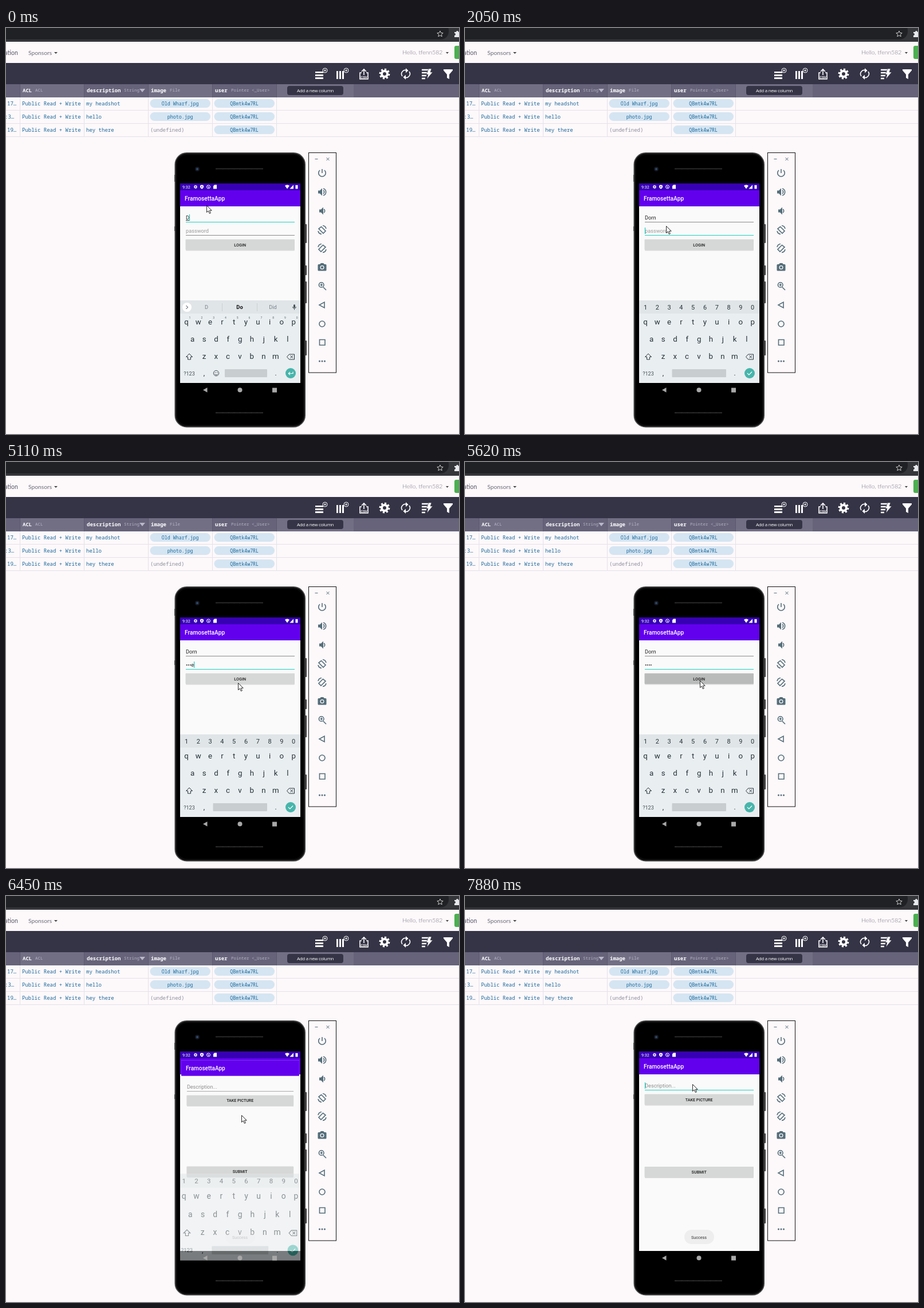
Recreate the animation shown at these times as an HTML page. Size 791x708 px, loop 8000 ms.

```html
<!DOCTYPE html>
<html lang="en">
<head>
<meta charset="utf-8">
<title>Login demo</title>
<style>
html, body { margin: 0; width: 100%; height: 100%; overflow: hidden; background: #fdf8fa; }
svg { display: block; }
text { white-space: pre; font-family: Roboto, sans-serif; }
.mono { font-family: "Noto Sans Mono", "DejaVu Sans Mono", monospace; }
.nav { font-family: Lato, sans-serif; }
.add { font-family: "Open Sans", sans-serif; letter-spacing: -.3px; }
.line { fill: none; stroke-width: 1.6; }
</style>
</head>
<body>
<svg id="stage" width="791" height="708" viewBox="0 0 791 708"></svg>
<script>
const stage = document.getElementById('stage');
const $ = id => document.getElementById(id);
const rect = (x, y, w, h, fill, more = '') =>
  `<rect x="${x}" y="${y}" width="${w}" height="${h}" fill="${fill}" ${more}/>`;
const disc = (x, y, r, fill, more = '') => `<circle cx="${x}" cy="${y}" r="${r}" fill="${fill}" ${more}/>`;
const path = (d, more = '') => `<path d="${d}" ${more}/>`;
const text = (x, y, s, size, fill, more = '') =>
  `<text x="${x}" y="${y}" font-size="${size}" fill="${fill}" ${more}>${s}</text>`;
const mid = 'text-anchor="middle"';
const group = (x, y, body, more = '') => `<g transform="translate(${x} ${y})" ${more}>${body}</g>`;
const gear = (r, w, color) =>
  disc(0, 0, r, 'none', `stroke="${color}" stroke-width="${w}"`) +
  disc(0, 0, r + w * .7, 'none', `stroke="${color}" stroke-width="${w * .8}" pathLength="16" stroke-dasharray="1"`);

function browser() {
  const plus = (x, y) => disc(x, y, 4, '#353446', 'stroke="#fff"') +
    path(`M${x - 2} ${y}h4m-2-2v4`, 'stroke="#fff"');
  const bars = [0, 1, 2].map(i => rect(540, 76 + i * 5, 14, i ? 3 : 2.5, '#fff') +
    rect(577 + i * 5, 75, 3, 14, '#fff')).join('');
  return rect(0, 0, 791, 24, '#35363a') + rect(-20, -10, 793, 30, '#202124', 'rx="14"') +
    path('M758 5l1.5 3.4 3.7.4-2.8 2.4.8 3.7-3.2-2-3.2 2 .8-3.7-2.8-2.4 3.7-.4z', 'fill="none" stroke="#ccc"') +
    path('M783 7h3a2 2 0 0 1 4 0h3v9h-10v-3a2 2 0 0 0 0-4z', 'fill="#e8eaed"') +
    text(21, 47, 'ation', 10.6, '#555566', 'class="nav" text-anchor="end"') +
    text(39, 47, 'Sponsors', 10.3, '#6b6b78', 'class="nav"') + path('M84 42h6l-3 3z', 'fill="#444"') +
    text(692, 46, 'Hello, tfenn582', 10.4, '#777784', 'class="nav" font-weight="300"') +
    path('M768 42h5l-2.500 3z', 'fill="#444"') +
    rect(783, 31, 20, 23, '#4caf50', 'rx="3"') +
    rect(0, 61, 791, 37, '#353446') + bars + plus(557, 74) + plus(594, 74) +
    path('M621 78h-3v11h14v-11h-3M625 82v-10m-4 4 4-4 4 4', 'class="line" stroke="#fff"') +
    text(625, 87.500, 'CSV', 6, '#fff', mid + ' font-weight="700"') +
    group(661, 80, gear(5, 4, '#fff')) +
    path('M692 84a6.500 6.500 0 0 1 8-9.800M704 76a6.500 6.500 0 0 1-8 9.800', 'class="line" stroke="#fff" stroke-width="2"') +
    path('M698 70l4.500 4.200-4.500 4zM698 90l-4.500-4.200 4.500-4z', 'fill="#fff"') +
    path('M726 73h13m-13 5h9m-9 5h8m-8 5h6', 'stroke="#fff" stroke-width="2.500"') +
    path('M738 71h5l-2 6h4l-10 12 2-8h-3z', 'fill="#fff" stroke="#353446" stroke-width=".6"') +
    path('M764 72h16v2l-6 7v8l-4-2v-6l-6-7z', 'fill="#fff"');
}

function table() {
  const blue = '#1b699c', cols = [24, 136, 248, 360, 472];
  const heads = [['ACL', 'ACL'], ['description', 'String'], ['image', 'File'], ['user', 'Pointer &lt;_User&gt;']];
  const small = [51, 206, 286, 393];
  let s = rect(0, 98, 791, 23, '#66637a');
  cols.forEach((x, i) => {
    if (i % 2 == 0) s += rect(x, 98, i == 4 ? 135 : 112, 23, '#726f85');
    s += rect(x, 98, 1, 23, '#5b586f') + rect(x, 121, 1, 68, '#e4e2ea');
    if (heads[i]) s += text(x + 5, 112, heads[i][0], 9, '#fff', 'class="mono" font-weight="600"') +
      text(small[i], 111, heads[i][1], 7.5, '#b5b3c4', 'class="mono"');
  });
  s += path('M233 106h10l-5 6z', 'fill="#b9b7c8"') + rect(491, 101, 98, 16, '#353446', 'rx="4"') +
    text(508, 112, 'Add a new column', 8, '#fff', 'class="add"');
  const rows = [['17…', 'my headshot', 'Old Wharf.jpg'], [':3…', 'hello', 'photo.jpg'], ['19…', 'hey there']];
  rows.forEach(([day, note, file], i) => {
    const y = 135 + 23 * i;
    const cell = (x, t, color = blue) => text(x, y, t, 9, color, 'class="mono"');
    const pill = (x, t) => rect(x, y - 11, 105.500, 15, '#d5e5f2', 'rx="7.500"') +
      text(x + 52.700, y, t, 8.300, blue, `class="mono" ${mid}`);
    s += rect(0, y + 8, 791, 1, '#e4e2ea') + cell(i == 1 ? -2 : 2, day) + cell(28, 'Public Read + Write') +
      cell(140, note) + (file ? pill(251.500, file) : cell(252, '(undefined)', '#8f8f9c')) + pill(363.500, 'QBmtk4w7RL');
  });
  return s;
}

function phone() {
  const grille = y => path(`M366 ${y}h83`, 'stroke="#2b2b2b" stroke-width="2"') +
    path(`M370 ${y + 1}h75`, 'stroke="#111" stroke-dasharray="7 3"');
  return [[342, 33], [414, 17], [442, 38], [545, 26]].map(([y, h]) => rect(521, y, 4, h, '#3d3d3d', 'rx="1"')).join('') +
    rect(294, 256, 2, 12, '#3d3d3d') + rect(294, 346, 2, 8, '#3d3d3d') +
    rect(295.500, 218, 226.500, 477.500, '#000', 'rx="20" stroke="#404040" stroke-width="2"') +
    rect(298, 220.500, 221.500, 472.500, '#000', 'rx="18" stroke="#151515"') +
    disc(334, 246, 4, '#151820') + disc(334, 246, 2, '#30486a') + grille(245.500) + grille(671);
}

function panel() {
  const color = '#546e7a';
  const line = (y, d) => group(552, y, path(d, `class="line" stroke="${color}"`));
  const speaker = 'M-7-2.500h3l4-4v13l-4-4h-3z';
  const turn = d => path('M-1.500-5.500 6 2 2 6-6-2z' + d, `class="line" stroke="${color}"`);
  const arcs = 'M-7 2a7 7 0 0 0 6 5.500M7-2a7 7 0 0 0-6-5.500';
  return rect(528.500, 217.500, 48, 383.500, '#fdf8fa', 'stroke="#111"') +
    path('M539.500 228.500h5m15-2.500 5 5m0-5-5 5', `stroke="${color}" fill="none"`) +
    line(253, 'M0-7v7M-4-5a6.200 6.200 0 1 0 8 0') +
    group(552, 286, path(speaker, `fill="${color}"`)) + line(286, 'M2-3a3.500 3.500 0 0 1 0 6M2-6a6.200 6.200 0 0 1 0 12') +
    group(554, 319, path(speaker, `fill="${color}"`)) + line(319, 'M3-3a3.500 3.500 0 0 1 0 6') +
    group(552, 352, turn(arcs)) + group(552, 384, turn(arcs), 'data-side="right"').replace('552 384)', '552 384) scale(-1 1)') +
    path('M546 412h2l2-2h4l2 2h2q1.500 0 1.500 1.500v8.500q0 1.500-1.500 1.500h-12q-1.500 0-1.500-1.500v-8.500q0-1.500 1.500-1.500z', `fill="${color}"`) +
    disc(552, 417.500, 2.900, color, 'stroke="#fdf8fa" stroke-width="1.300"') +
    line(450, 'M2 2l5 5M3-2a4.300 4.300 0 1 1-8.600 0 4.300 4.300 0 0 1 8.600 0M-3.500-2h4.500m-2.200-2.200v4.500') +
    line(483, 'M4-5v10l-9-5z') + line(516, 'M5 0a5 5 0 1 1-10 0 5 5 0 0 1 10 0') + line(548, 'M-4.500-4.500h9.500v9.500h-9.500z') +
    [-4.500, 0, 4.500].map(x => disc(552 + x, 581, 1.500, color)).join('');
}

const button = (y, label, id) => rect(314, y + 1, 190, 19, '#000', 'opacity=".13" rx="1"') +
  rect(313.500, y, 190.500, 18.500, '#d6d7d7', `rx="1" id="${id}"`) +
  text(408.700, y + 12, label, 7.200, '#1c1c1c', mid + ' font-weight="500"');
const field = (y, id, value, color) => text(314, y, value, 9.200, color, `id="${id}"`) +
  rect(314, y + 4, 190, 1, '#8a8a8a', `id="${id}Line"`);
const screen = body => rect(304, 283, 210, 336, '#fafafa') + rect(304, 283, 210, 28, '#6200ee') +
  text(312, 301, 'FramosettaApp', 10.200, '#fff', 'font-weight="500"') + body;

function keyboard() {
  const ink = '#263238', step = 20.800;
  const row = (keys, x, y, size) => [...keys].map((k, i) => text(x + step * i, y, k, size, ink, mid)).join('');
  const smallNums = [...'1234567890'].map((k, i) => text(321 + step * i, 507, k, 5, '#5a666c', mid)).join('');
  return rect(304, 475, 210, 144, '#e9eef1') + rect(304, 475, 210, 23, '#e0e5e8') +
    row('qwertyuiop', 315, 517, 13.300) + row('asdfghjkl', 325.500, 547, 13.300) + row('zxcvbnm', 346, 577, 13.300) +
    path('M320 568l5.500 5.500h-3v4.500h-5v-4.500h-3z', `fill="none" stroke="${ink}"`) +
    path('M494.500 569h9v9h-9l-4-4.500zM496.500 571.200l4.500 4.500m0-4.500-4.500 4.500', `fill="none" stroke="${ink}"`) +
    text(320, 605.500, '?123', 9, '#455056', mid) + text(346, 606, ',', 12, ink, mid) + text(471, 606, '.', 12, ink, mid) +
    rect(382, 595, 74, 14, '#c8cdd0', 'rx="1" id="space"') + disc(497, 602, 9, '#47b5ab') +
    `<g id="words">${smallNums + disc(316, 487, 8, '#fff') + path('M314.500 484l3 3-3 3', `fill="none" stroke="${ink}"`) +
      ['#78838a', '#111', '#78838a'].map((c, i) => text(350 + 58 * i, 490, '', 9.300, c,
        `${mid} id="word${i}" font-weight="${i == 1 ? 700 : 400}"`)).join('') +
      rect(377, 480, 1, 14, '#cbd1d4') + rect(438, 480, 1, 14, '#cbd1d4') +
      rect(502, 482, 3, 6, '#455056', 'rx="1.500"') + path('M500.500 486a3 3 0 0 0 6 0M503.500 489v2.500', 'fill="none" stroke="#455056"') +
      disc(367, 602, 4.700, 'none', 'stroke="#455056"') + disc(365.300, 600.700, .8, '#455056') + disc(368.700, 600.700, .8, '#455056') +
      path('M364.300 603.200a3 3 0 0 0 5.400 0M500.500 599.500v2.700h-7m2.500-2.700-2.700 2.700 2.700 2.700', 'fill="none" stroke="#455056"')
        .replace('M500.500 599.500v2.700h-7m2.500-2.700-2.700 2.700 2.700 2.700', '') +
      path('M501 599.500v3h-7.500m2.500-2.700-2.700 2.700 2.700 2.700', 'fill="none" stroke="#fff" stroke-width="1.200"')}</g>` +
    `<g id="digits">${row('1234567890', 315, 491, 11) +
      path('M493 602l2.800 2.800 5.200-5.300', 'fill="none" stroke="#fff" stroke-width="1.200"')}</g>`;
}

const statusBar = () => rect(304, 271, 210, 12, '#3700b3') + text(308, 279.500, '9:32', 7.200, '#fff') +
  group(331, 277, gear(1.700, 1.300, '#fff')) +
  path('M342 273.500l3 1.200v2.300q0 2.500-3 3.700-3-1.200-3-3.700v-2.300z', 'fill="#fff"') + disc(342, 277, 1, '#3700b3') +
  disc(353.500, 277, 3, 'none', 'stroke="#fff"') + path('M352 275.500l3 3m-1.500-2.500v3', 'stroke="#fff" stroke-width=".8"') +
  path('M364 273.500h4v7h-6v-5z', 'fill="#fff"') +
  path('M487 275q4-3 8 0l-4 5.500zM502 273.500v7h-6.500z', 'fill="#fff"') + rect(505.500, 274, 4, 6.500, '#fff', 'rx=".6"');

const navBar = () => path('M351.500 627v8.500l-7.500-4.200z', 'fill="#a8a8a8"') + disc(408.500, 631.300, 4, '#a8a8a8') +
  rect(465, 627.500, 8, 8, '#a8a8a8');

stage.innerHTML = `<clipPath id="glass"><rect x="304" y="271" width="210" height="365"/></clipPath>` +
  browser() + table() + phone() + panel() +
  `<g clip-path="url(#glass)">
    <g id="login">${screen(field(334, 'user', '', '#222') + field(357, 'pass', '', '#222') +
      text(314, 357, 'password', 9.200, '#9a9a9a', 'id="hint"') + button(368.500, 'LOGIN', 'loginButton'))}</g>
    <g id="post">${screen(field(334, 'note', 'Description...', '#8d8d8d') +
      button(345.500, 'TAKE PICTURE', 'take') + button(472, 'SUBMIT', 'submit'))}</g>
    <g id="keys">${keyboard()}</g>${statusBar() + navBar()}
    <g id="toast">${rect(383, 582, 52, 25, '#eeeeee', 'rx="12.500"') + text(408.500, 597.500, 'Success', 7.200, '#333', mid)}</g>
  </g>` + rect(0, 0, 1, 11, '#03bfae', 'id="caret"') +
  path('M0 0V12L2.800 9.400 4.800 14 6.800 13.200 4.900 8.700H8.700Z', 'id="mouse" fill="#fff" stroke="#111" stroke-width=".9"');

// Each track lists [start time, value...]; the value holds until the next entry.
const mouse = [[0, 350, 309], [1390, 350, 328], [1510, 351, 345], [4590, 371, 361], [4710, 395, 379], [4830, 405, 387],
  [5110, 405, 385], [5230, 406, 381], [5380, 410, 381], [6180, 411, 382], [6600, 410, 379], [7000, 410, 378],
  [7430, 407, 346], [7580, 404, 338], [7730, 397, 328]];
const userText = [[0, 'D'], [280, 'Do'], [830, 'Dor'], [1110, 'Dorn']];
const passText = [[0, ''], [2980, 'm'], [3380, '•a'], [3810, '••z'], [4060, '•••e'], [5500, '••••']];
const words = [[0, 'D', 'Do', 'Did'], [400, 'Do', "Don't", 'Dog'], [830, 'Dor', 'Door', 'Dorm'], [1110, 'Dorn', 'Born', 'Dorm']];
const caretOn = [[0, 1], [1660, 0], [1780, 1], [2430, 0], [2980, 1], [4590, 0], [5110, 1], [5620, 0], [6180, 1], [6450, 0], [7880, 1]];
const pressed = [[0, '#d6d7d7'], [5500, '#c6c8c7'], [5620, '#b9bbba'], [5770, '#d6d7d7']];
const zoom = [[0, .98], [6600, .996], [6730, 1]];
const toast = [[0, 0], [6450, .22], [6600, .65], [6730, 1]];
const at = (track, t) => track.findLast(e => e[0] <= t).slice(1);
const show = (id, on) => $(id).style.display = on ? '' : 'none';
const set = (id, name, value) => $(id).setAttribute(name, value);

function draw(t) {
  const onPass = t >= 1660, secret = t >= 2050, posted = t >= 6450;
  const [x, y] = at(mouse, t);
  set('mouse', 'transform', `translate(${x + .5} ${y + .5})`);
  $('user').textContent = at(userText, t)[0];
  $('pass').textContent = at(passText, t)[0];
  set('user', 'text-decoration', onPass ? 'none' : 'underline');
  show('hint', t < 2980);
  const tint = on => on ? '#1fd0bd' : '#8a8a8a';
  set('userLine', 'fill', tint(!onPass));
  set('passLine', 'fill', tint(onPass));
  set('noteLine', 'fill', t >= 7880 ? tint(true) : '#a5a5a5');
  set('loginButton', 'fill', at(pressed, t)[0]);

  const active = posted ? 0 : $(onPass ? 'pass' : 'user').getComputedTextLength();
  set('caret', 'transform', `translate(${314 + active} ${onPass && !posted ? 348 : 325})`);
  show('caret', at(caretOn, t)[0]);

  at(words, t).forEach((w, i) => $('word' + i).textContent = w);
  show('words', !secret);
  show('digits', secret);
  set('space', 'x', secret ? 361.5 : 382);
  set('space', 'width', secret ? 94.5 : 74);
  show('keys', t < 6600);
  set('keys', 'opacity', posted ? .52 : 1);
  set('keys', 'transform', posted ? 'matrix(1.045 0 0 1.05 -18.4 -14.35)' : '');

  show('post', posted);
  set('post', 'transform', `translate(409 446) scale(${at(zoom, t)[0]}) translate(-409 -446)`);
  set('toast', 'opacity', at(toast, t)[0]);
}

function tick() {
  draw(performance.now() % 8000);
  requestAnimationFrame(tick);
}
tick();
</script>
</body>
</html>
```
